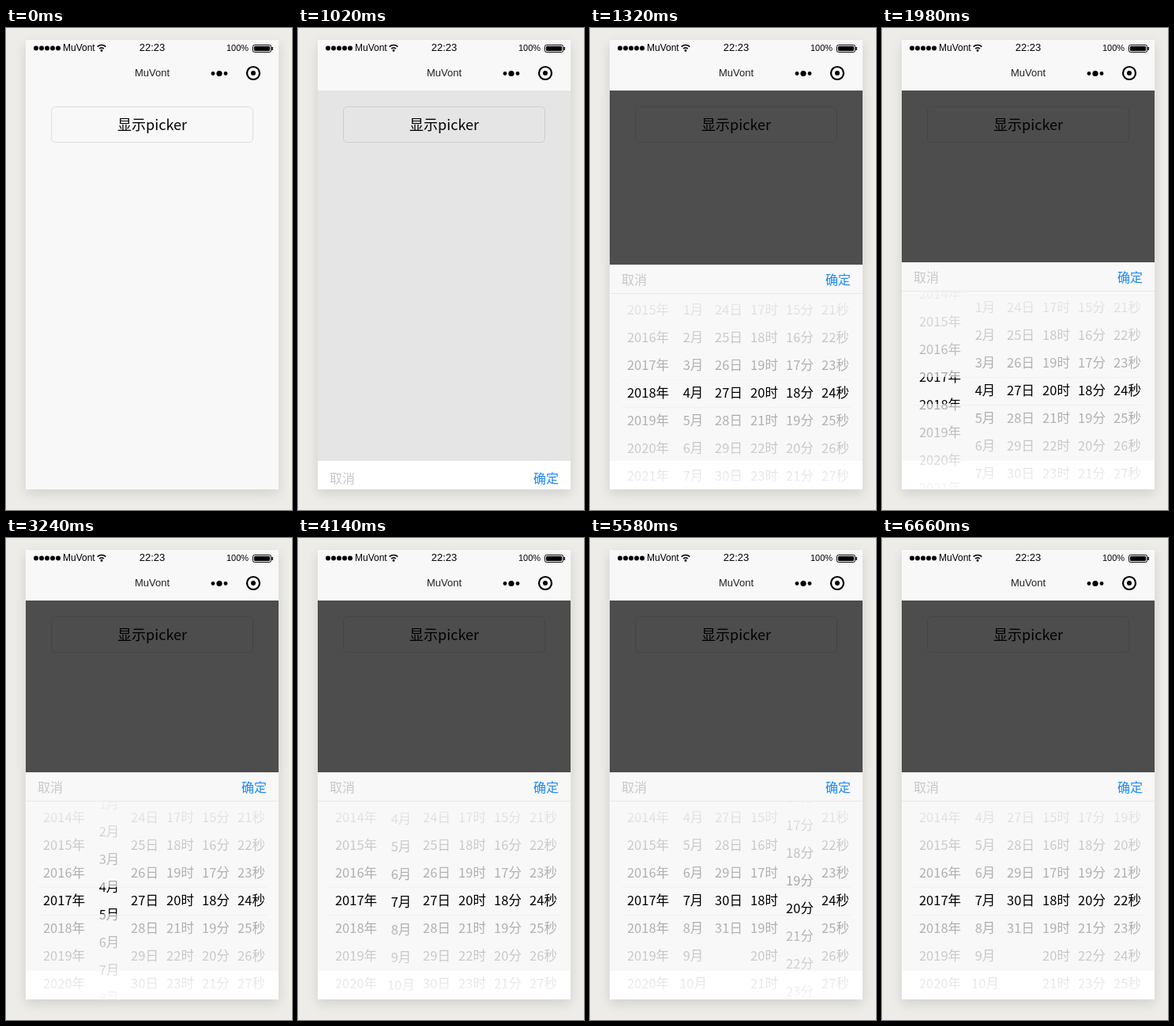
These frames come from a looping animation (362 by 609 pixels, 7920 ms). An HTML page with a canvas:

```html
<!DOCTYPE html>
<html lang="zh">
<head>
<meta charset="utf-8">
<style>
  html, body { margin: 0; width: 100%; height: 100%; overflow: hidden; background: #edece8; }
  canvas { display: block; }
</style>
</head>
<body>
<canvas id="stage" width="362" height="609"></canvas>
<script>
const ctx = document.getElementById('stage').getContext('2d');
const LOOP = 7920, STEP = 60;
const PRESS = 840, OPEN = 975, OPEN_TIME = 400;
const LEFT = 25, TOP = 15, WIDTH = 320, BOTTOM = 583, NAV_BOTTOM = 79;
const PANEL = 287, HEADER = 37, ROW = 35, CENTER = 162;
const APP = 'MuVont';
const CJK = '"Noto Sans CJK SC", "Noto Sans CJK", sans-serif';
const ARIAL = '"Liberation Sans", Arial, sans-serif';

// Each wheel is dragged by some rows, optionally resting on the way
const wheels = [
  { unit: '年', value: 2018, rows: -1, start: 1980, end: 2700, rest: 420 },
  { unit: '月', value: 4, rows: 3, start: 3240, end: 4260, min: 1, max: 12 },
  { unit: '日', value: 27, rows: 3, start: 4260, end: 4740, min: 1, max: 31 },
  { unit: '时', value: 20, rows: -2, start: 4800, end: 5220, max: 23 },
  { unit: '分', value: 18, rows: 2, start: 5220, end: 5820, max: 59 },
  { unit: '秒', value: 24, rows: -2, start: 6000, end: 6660, max: 59 }
];

const clamp = (v, low, high) => Math.min(high, Math.max(low, v));

// A drag jumps half a row, then eases out to its last row
function dragged({ rows, start, end, rest = 0 }, t) {
  if (t < start) return 0;
  const elapsed = t - start - clamp(t - start - 120, 0, rest);
  const left = 1 - clamp(elapsed / (end - start - rest), 0, 1);
  return rows - Math.sign(rows) * (Math.abs(rows) - .5) * left ** 1.8;
}

// cubic-bezier(.25, .1, .25, 1)
function ease(x) {
  if (x <= 0) return 0;
  if (x >= 1) return 1;
  const curve = (s, a, b) => 3 * a * s * (1 - s) ** 2 + 3 * b * s * s * (1 - s) + s ** 3;
  let low = 0, high = 1;
  for (let i = 0; i < 20; i++) {
    const mid = (low + high) / 2;
    if (curve(mid, .25, .25) < x) low = mid; else high = mid;
  }
  return curve(low, .1, 1);
}

function text(str, x, y, size, family, color = '#000', align = 'center') {
  const weight = family === CJK ? 300 : 400;
  ctx.font = `${weight} ${size}px ${family}`;
  ctx.textAlign = align;
  ctx.fillStyle = color;
  ctx.fillText(str, x, y);
}

function rect(x, y, w, h, color) {
  ctx.fillStyle = color;
  ctx.fillRect(x, y, w, h);
}

function roundRect(x, y, w, h, r, fill, stroke) {
  ctx.beginPath();
  ctx.roundRect(x, y, w, h, r);
  if (fill) { ctx.fillStyle = fill; ctx.fill(); }
  if (stroke) { ctx.strokeStyle = stroke; ctx.lineWidth = 1; ctx.stroke(); }
}

function dot(x, y, r) {
  ctx.beginPath();
  ctx.arc(x, y, r, 0, 2 * Math.PI);
  ctx.fillStyle = '#000';
  ctx.fill();
}

function arc(x, y, r, width, from = 0, to = 2 * Math.PI) {
  ctx.beginPath();
  ctx.arc(x, y, r, from, to);
  ctx.lineWidth = width;
  ctx.strokeStyle = '#000';
  ctx.stroke();
}

function clipRect(y, h) {
  ctx.beginPath();
  ctx.rect(LEFT, y, WIDTH, h);
  ctx.clip();
}

function drawPhone(pressed) {
  rect(0, 0, 362, 609, '#edece8');
  ctx.save();
  ctx.shadowColor = 'rgba(0,0,0,.12)';
  ctx.shadowBlur = 14;
  ctx.shadowOffsetY = 5;
  rect(LEFT, TOP, WIDTH, BOTTOM - TOP, '#f8f8f8');
  ctx.restore();

  for (let i = 0; i < 5; i++) dot(38 + 7 * i, 25.5, 3);
  text(APP, 72, 29, 12, ARIAL, '#000', 'left');
  for (const r of [4, 7.5]) arc(121, 29, r, 1.7, -Math.PI * .75, -Math.PI * .25);
  dot(121, 28.5, 1.4);
  text('22:23', 185, 29, 13, ARIAL);
  text('100%', 279, 29, 11, ARIAL, '#000', 'left');
  roundRect(312.5, 21.5, 23, 9, 2, null, '#000');
  roundRect(314, 23, 20, 6, 1, '#000');
  rect(336.5, 24, 1.5, 4, '#000');

  text(APP, 185, 61, 13, ARIAL, '#222');
  for (const i of [-1, 0, 1]) dot(270 + 8 * i, 57.5, i ? 2.4 : 3.6);
  arc(313, 57, 8, 2.2);
  dot(313, 57, 3);

  roundRect(57.5, 99.5, 255, 45, 5, pressed ? '#dedede' : '#f8f8f8', '#dedede');
  text('显示picker', 185, 129, 18, CJK);
}

function drawWheels(t) {
  // Rows fade away from the selected band
  const fade = ctx.createLinearGradient(0, HEADER, 0, PANEL);
  for (const [pos, alpha] of [[0, .03], [.43, .34], [.431, 1]]) {
    fade.addColorStop(pos, `rgba(0,0,0,${alpha})`);
    fade.addColorStop(1 - pos, `rgba(0,0,0,${alpha})`);
  }
  clipRect(HEADER, PANEL - HEADER);
  wheels.forEach((wheel, i) => {
    const { unit, value, min = 0, max = Infinity } = wheel;
    const x = i ? 85.5 + 45 * i : 73.5;
    const pos = value + dragged(wheel, t);
    const first = Math.max(min, Math.floor(pos) - 4);
    for (let n = first; n <= Math.min(max, pos + 4); n++)
      text(n + unit, x, Math.round(CENTER + (n - pos) * ROW) + 6, 16.5, CJK, fade);
  });
}

function drawPanel(t, shown) {
  const top = Math.round(BOTTOM - PANEL * shown);
  ctx.save();
  clipRect(TOP, BOTTOM - TOP);
  rect(LEFT, NAV_BOTTOM, WIDTH, BOTTOM - NAV_BOTTOM, `rgba(0,0,0,${.69 * shown})`);
  ctx.translate(0, top);
  rect(LEFT, 0, WIDTH, PANEL, '#f8f8f8');
  rect(LEFT, 547 - top, WIDTH, 36, '#fff');
  rect(LEFT, HEADER - 1, WIDTH, 1, '#e8e8e8');
  text('取消', 40, 25, 16, CJK, '#c8c8c8', 'left');
  text('确定', 330, 25, 16, CJK, '#1989fa', 'right');
  for (const y of [145, 145 + ROW]) rect(40, y, 290, 1, '#f0f0f0');
  drawWheels(t);
  ctx.restore();
}

function draw(now) {
  const t = Math.floor(now % LOOP / STEP) * STEP;
  const shown = ease((t - OPEN) / OPEN_TIME);
  drawPhone(t >= PRESS && !shown);
  if (shown) drawPanel(t, shown);
}

const start = performance.now();
(function frame() {
  draw(performance.now() - start);
  requestAnimationFrame(frame);
})();
</script>
</body>
</html>
```
